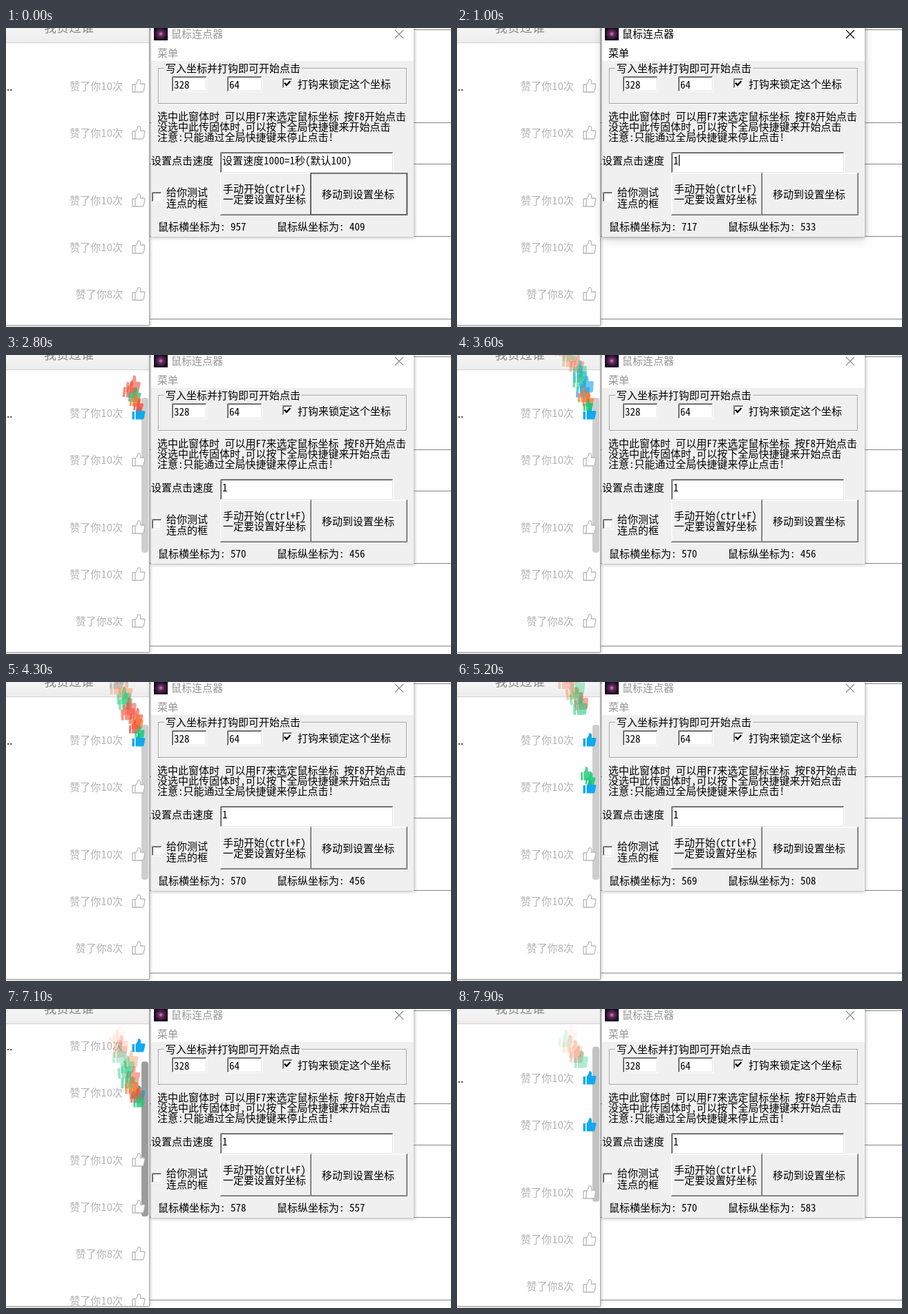
Write an HTML page that moves like this. It is 644 px wide and 434 px high and loops after 8000 ms.

```html
<!DOCTYPE html>
<html lang="zh-CN">
<head>
<meta charset="utf-8">
<style>
html, body { margin: 0; width: 100%; height: 100%; overflow: hidden; background: #fff; }
svg { display: block; }
text { font: 15px "Noto Sans Mono CJK SC", "Noto Sans CJK SC", "Noto Sans CJK", monospace; white-space: pre; }
.ui { font-family: "Noto Sans CJK SC", "Noto Sans CJK", sans-serif; }
</style>
</head>
<body>
<svg id="stage" width="644" height="434" viewBox="0 0 644 434">
  <defs>
    <filter id="soft" x="-20%" y="-20%" width="140%" height="140%"><feGaussianBlur stdDeviation="2.5"/></filter>
    <filter id="wide" x="-20%" y="-20%" width="140%" height="140%"><feGaussianBlur stdDeviation="8"/></filter>
    <clipPath id="panelClip"><rect width="207" height="431"/></clipPath>
    <radialGradient id="nebula"><stop offset="0" stop-color="#d68cb0"/><stop offset=".35" stop-color="#6b2c60"/><stop offset="1" stop-color="#120a1e"/></radialGradient>
    <linearGradient id="head" x2="0" y2="1"><stop offset="0" stop-color="#f5f5f5"/><stop offset="1" stop-color="#ededed"/></linearGradient>
  </defs>
  <rect width="644" height="434" fill="#fff"/>
  <path d="M208 2.5H644M208 137.5H644M208 197.5H644M208 302.5H644M208 422.5H644" stroke="#858585"/>
  <g id="panel"></g>
  <g id="app"></g>
</svg>
<script>
const LOOP = 8000, STEP = 100;
const $ = id => document.getElementById(id);

function add(parent, tag, attrs, content) {
  const el = document.createElementNS('http://www.w3.org/2000/svg', tag);
  for (const key in attrs) el.setAttribute(key, attrs[key]);
  if (content !== undefined) el.textContent = content;
  return parent.appendChild(el);
}
const rect = (parent, x, y, width, height, fill, more) =>
  add(parent, 'rect', { x, y, width, height, fill, ...more });
// Text placed by its left edge and vertical middle.
const label = (parent, x, middle, content, more) =>
  add(parent, 'text', { x, y: middle + 5.5, fill: '#000', ...more }, content);

// Two-tone border one pixel wide.
function edge(parent, x, y, w, h, topLeft, bottomRight) {
  const line = (d, stroke) => add(parent, 'path', { d, stroke, fill: 'none' });
  line(`M${x + .5} ${y + h - .5}V${y + .5}H${x + w}`, topLeft);
  line(`M${x} ${y + h - .5}H${x + w - .5}V${y}`, bottomRight);
}
function sunken(x, y, w, h) {
  rect(app, x, y, w, h, '#fff');
  edge(app, x, y, w, h, '#8c8c8c', '#fff');
  edge(app, x + 1, y + 1, w - 2, h - 2, '#555', '#e3e3e3');
}
function raised(x, y, w, h) {
  rect(app, x, y, w, h, '#f0f0f0');
  edge(app, x, y, w, h, '#fff', '#696969');
  edge(app, x + 1, y + 1, w - 2, h - 2, '#f8f8f8', '#a0a0a0');
}

const OUTLINE = 'M-9-2H-5V9H-9ZM-5-2C-2-4-1.4-6-1.2-9C2-10.5 3.6-7 2.4-3H7.6Q9.2-2.8 8.8-1L7.2 7.4Q6.8 9 5 9H-5Z';
const SOLID = 'M-9.5-2H-6V9.5H-9.5ZM-4.5-2.2C-2-4-1-6.5-1-9.5C2.4-11 4-7.5 2.8-3H8Q9.8-2.8 9.4-1L7.6 7.8Q7.2 9.5 5.4 9.5H-4.5Z';

// Left list
const panel = $('panel');
rect(panel, 0, -10, 208, 442, '#777', { filter: 'url(#soft)', opacity: .7 });
rect(panel, 0, 0, 207, 431, '#fff');
const view = add(panel, 'g', { 'clip-path': 'url(#panelClip)' });
const bar = rect(view, 196, 62, 10, 225, '#cecece', { rx: 4 });
const list = add(view, 'g', {});
label(list, 1, 85, '..', { class: 'ui' });
const thumbs = [84, 152, 250, 318, 386, 454].map((y, i) => {
  label(list, 169, y, i === 4 ? '赞了你8次' : '赞了你10次',
    { class: 'ui', 'text-anchor': 'end', fill: '#b2b2b2' });
  return add(list, 'path', { transform: `translate(192 ${y})`, 'stroke-width': 1.3, 'stroke-linejoin': 'round' });
});
rect(view, 0, 0, 207, 21, 'url(#head)');
rect(view, 0, 21, 207, 1, '#d2d2d2');
label(view, 55, 0, '我赞过谁', { class: 'ui', fill: '#8a8a8a', style: 'font-size:18px' });
const sparkLayer = add(view, 'g', {});
add(panel, 'path', { d: 'M207.5 0V431.5H0', fill: 'none', stroke: '#a9a9a9' });

// Clicker window
const app = $('app');
const halo = rect(app, 210, -20, 380, 328, '#000', { filter: 'url(#wide)' });
rect(app, 210, -10, 381, 314, '#555', { filter: 'url(#soft)', opacity: .5 });
rect(app, 210, -1, 380, 304, '#f0f0f0');
rect(app, 210, -1, 380, 49, '#fff');
rect(app, 214, -1, 20, 19, 'url(#nebula)');
const captions = [
  label(app, 239, 8, '鼠标连点器', { class: 'ui' }),
  label(app, 219, 36, '菜单', { 'font-weight': 700 })
];
const cross = add(app, 'path', { d: 'M563 3L575 15M575 3L563 15', fill: 'none', 'stroke-width': 1.1 });

add(app, 'rect', { x: 221.5, y: 59.5, width: 359, height: 51, fill: 'none', stroke: '#fff' });
add(app, 'rect', { x: 220.5, y: 58.5, width: 359, height: 51, fill: 'none', stroke: '#a0a0a0' });
rect(app, 229, 52, 199, 14, '#f0f0f0');
label(app, 231, 58, '写入坐标并打钩即可开始点击');
sunken(240, 70, 51, 23);
label(app, 243, 82, '328');
sunken(320, 70, 51, 23);
label(app, 323, 82, '64');
sunken(400, 73, 15, 15);
add(app, 'path', { d: 'M403 79.5L406 83L411.5 77', fill: 'none', stroke: '#000', 'stroke-width': 2.4 });
label(app, 422, 81, '打钩来锁定这个坐标');

label(app, 219, 128, '选中此窗体时 可以用F7来选定鼠标坐标 按F8开始点击');
label(app, 219, 143.5, '没选中此传固体时,可以按下全局快捷键来开始点击');
label(app, 219, 158, '注意:只能通过全局快捷键来停止点击!');

label(app, 210, 192, '设置点击速度');
sunken(310, 180, 251, 31);
const speed = label(app, 313, 192, '');
const caret = rect(app, 321, 184, 1.2, 16, '#000');

sunken(211, 238, 15, 15);
label(app, 232, 238.5, '给你测试');
label(app, 232, 254, '连点的框');
raised(440, 210, 141, 62);
raised(310, 210, 132, 62);
label(app, 314, 233, '手动开始(ctrl+F)');
label(app, 314, 248.5, '一定要设置好坐标');
const focusEdge = add(app, 'rect', { x: 441, y: 211, width: 139.5, height: 60, fill: 'none', stroke: '#5a5a5a', 'stroke-width': 1.6 });
label(app, 457, 241, '移动到设置坐标');
const readX = label(app, 220, 288, '');
const readY = label(app, 392, 288, '');

// Timelines: [time, value], linear between keys
const mouseX = [[0, 957], [800, 717], [1200, 717], [1900, 570], [4600, 570], [4900, 569], [6900, 569], [7100, 578], [7500, 578], [7900, 570]];
const mouseY = [[0, 409], [800, 533], [1200, 533], [1900, 456], [4600, 456], [4900, 508], [6900, 508], [7100, 557], [7900, 583]];
const scroll = [[6900, 0], [7100, -31], [7500, -31], [7800, 16]];

function at(keys, t) {
  if (t <= keys[0][0]) return keys[0][1];
  for (let i = 1; i < keys.length; i++) {
    const [t0, a] = keys[i - 1], [t1, b] = keys[i];
    if (t < t1) return a + (b - a) * (t - t0) / (t1 - t0);
  }
  return keys[keys.length - 1][1];
}

// Every click releases one coloured thumb that drifts up and fades.
const COLORS = { r: '#f2513c', o: '#f8742c', g: '#13c776', t: '#12b59a', b: '#1aa5e8' };
const bursts = [
  { start: 2300, y: 80, drift: 25, colors: 'rrgorgbgbbooggrrrorgogrg' },
  { start: 5000, y: 148, drift: 18, colors: 'ggoggooorrgoggrgoorg' }
];
const noise = n => { const v = Math.sin(n * 127.1 + 11.7) * 43758.5453; return (v - Math.floor(v)) * 2 - 1; };
const sparks = bursts.flatMap((burst, b) => [...burst.colors].map((c, i) => ({
  ...burst, born: burst.start + i * 100, seed: b * 100 + i * 3,
  el: add(sparkLayer, 'path', { d: SOLID, fill: COLORS[c] })
})));

function drawSpark({ el, born, y, drift, seed }, t) {
  const age = (t - born) / 1000;
  const alive = age > 0 && age < 1.6;
  el.setAttribute('display', alive ? 'inline' : 'none');
  if (!alive) return;
  const px = 192 - drift * age ** 1.3 + noise(seed) * Math.min(9, 2 + age * 9);
  const py = y - 75 * age;
  const size = .7 + .5 * Math.min(1, age / .45);
  el.setAttribute('transform', `translate(${px} ${py}) rotate(${noise(seed + 1) * 8}) scale(${size * .9} ${size * 1.1})`);
  el.setAttribute('opacity', .9 * (1 - age / 1.6));
}

function render(t) {
  const active = t >= 500 && t < 2200;
  const ink = active ? '#000' : '#959595';
  captions.forEach(el => el.setAttribute('fill', ink));
  cross.setAttribute('stroke', active ? '#000' : '#8a8a8a');
  halo.setAttribute('opacity', active ? .14 : 0);
  focusEdge.setAttribute('opacity', t < 800 ? 1 : 0);
  speed.textContent = t < 900 ? '设置速度1000=1秒(默认100)' : '1';
  caret.setAttribute('opacity', active && t >= 900 && (t - 900) % 1100 < 550 ? 1 : 0);
  readX.textContent = '鼠标横坐标为: ' + Math.round(at(mouseX, t));
  readY.textContent = '鼠标纵坐标为: ' + Math.round(at(mouseY, t));

  const offset = at(scroll, t);
  list.setAttribute('transform', `translate(0 ${offset})`);
  bar.setAttribute('y', 62 - offset * .46);
  bar.setAttribute('opacity', t < 1700 ? 0 : 1);
  bar.setAttribute('fill', t < 7000 ? '#cecece' : t < 7800 ? '#9c9c9c' : '#c2c2c2');
  thumbs.forEach((el, i) => {
    const liked = i < 2 && t >= bursts[i].start;
    el.setAttribute('d', liked ? SOLID : OUTLINE);
    el.setAttribute('fill', liked ? '#12a9ee' : '#fff');
    el.setAttribute('stroke', liked ? 'none' : '#b8b8b8');
  });
  sparks.forEach(spark => drawSpark(spark, t));
}

const begin = performance.now();
function tick() {
  const t = (performance.now() - begin) % LOOP;
  render(Math.floor(t / STEP) * STEP);
  requestAnimationFrame(tick);
}
tick();
</script>
</body>
</html>
```
